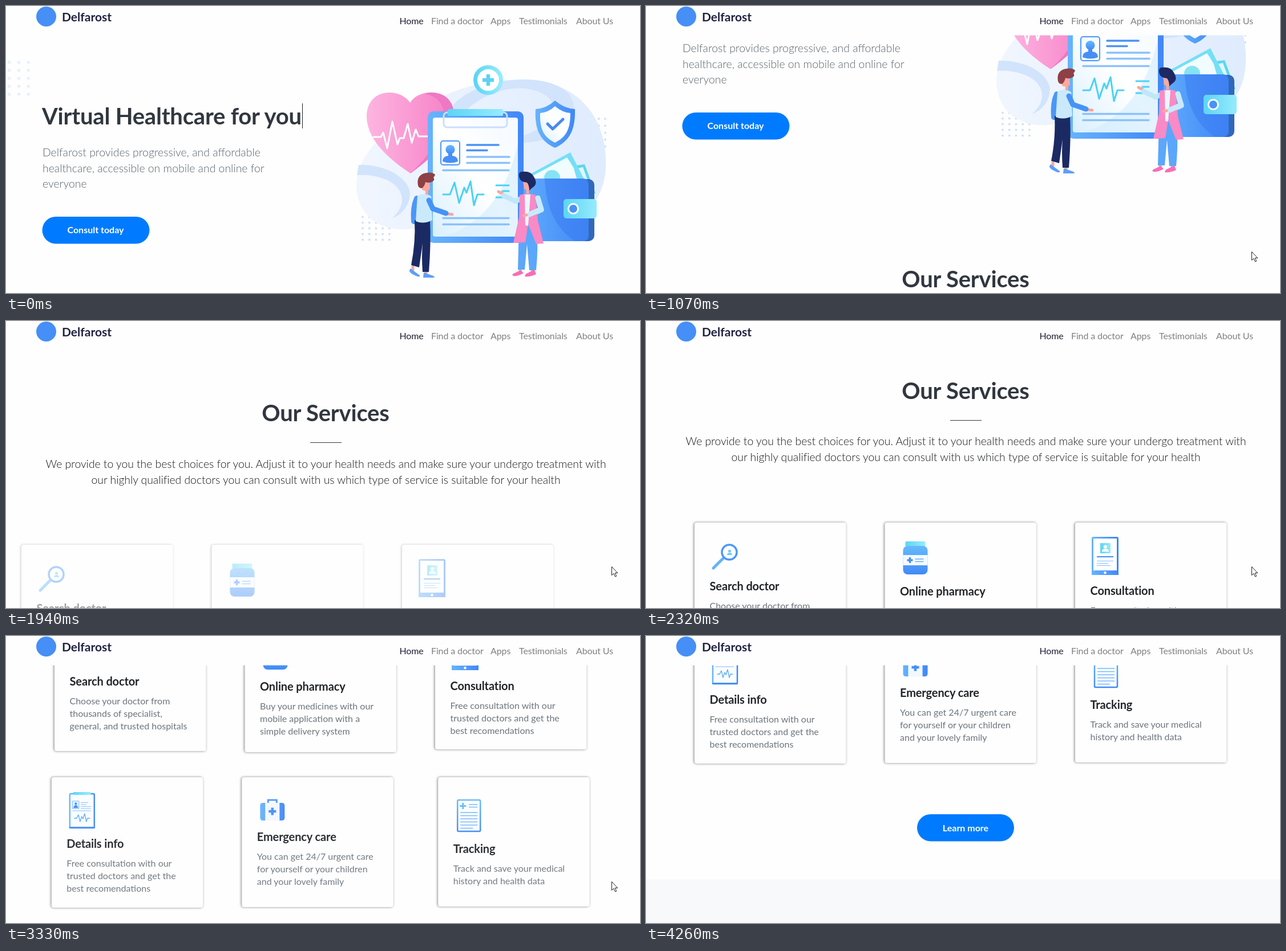
These frames come from a looping animation (1111x504 px, 4660 ms). An HTML page:

```html
<!DOCTYPE html>
<html lang="en">
<head>
<meta charset="utf-8">
<title>Virtual Healthcare</title>
<style>
html, body { margin: 0; height: 100%; overflow: hidden; background: #fefefe; }
svg { display: block; width: 1111px; height: 504px; }
text { font: 16px Lato, "Open Sans", sans-serif; fill: #6c757d; }
.title { font-size: 40px; font-weight: 700; letter-spacing: -.2px; fill: #31373f; }
.lead { font-size: 19.4px; font-weight: 300; fill: #59626a; }
.dark { letter-spacing: -.04px; fill: #14171a; }
.mid { text-anchor: middle; }
.button { font-weight: 700; fill: #fff; text-anchor: middle; }
.nav { fill: #808080; letter-spacing: -.12px; }
.brand { font-size: 21px; font-weight: 700; fill: #1f2340; }
.name { font-size: 20px; font-weight: 700; letter-spacing: -.12px; fill: #212529; }
.card { fill: #fefefe; filter: drop-shadow(-1px 0 2px rgba(0,0,0,.5)); }
.line { fill: none; stroke-linecap: round; stroke-linejoin: round; }
</style>
</head>
<body>
<svg viewBox="0 0 1111 504">
<defs>
  <linearGradient id="blue"><stop stop-color="#67b4fc"/><stop offset="1" stop-color="#4087f8"/></linearGradient>
  <linearGradient id="down" x2="0" y2="1"><stop stop-color="#66bafb"/><stop offset="1" stop-color="#418af7"/></linearGradient>
  <linearGradient id="cyan"><stop stop-color="#5cd5f5"/><stop offset="1" stop-color="#96ebfc"/></linearGradient>
  <linearGradient id="pink"><stop stop-color="#fdb5e1"/><stop offset="1" stop-color="#f77fc6"/></linearGradient>
  <linearGradient id="paper" x1="1" x2="0" y2="1"><stop stop-color="#f4faff"/><stop offset=".5" stop-color="#fff"/><stop offset="1" stop-color="#d8effd"/></linearGradient>
  <linearGradient id="mist"><stop stop-color="#f1f6fe"/><stop offset="1" stop-color="#dfecfe"/></linearGradient>
</defs>
<g id="page">
  <g id="dots"></g>
  <text class="title" x="63" y="208">Virtual Healthcare for you</text>
  <path d="M519.5 171v44" stroke="#222"/>
  <text class="lead" x="64" y="264">Delfarost provides progressive, and affordable</text>
  <text class="lead" x="64" y="292">healthcare, accessible on mobile and online for</text>
  <text class="lead" x="64" y="319">everyone</text>
  <rect x="63.500" y="370" width="188" height="47.500" rx="23.700" fill="#007bff"/>
  <text class="button" x="157" y="399">Consult today</text>

  <!-- backdrop -->
  <path fill="url(#mist)" d="M614 318C612 250 690 200 745 170C800 135 900 115 970 142C1035 168 1054 235 1051 285C1047 350 1000 385 950 390L735 385C670 408 616 375 614 318"/>
  <path fill="#d2e4fc" d="M618 279C665 277 707 302 708 330C707 350 695 366 676 373C694 358 698 340 690 325C678 302 640 295 615 297Z"/>
  <path fill="#d2e4fc" d="M775 185C810 130 920 115 970 142C1000 156 1002 190 985 215C960 232 930 240 905 240V228C945 215 975 185 950 160C910 130 840 145 800 190Z"/>

  <!-- heart -->
  <path fill="url(#pink)" d="M708 170C692 143 631 142 632 196C634 240 680 275 709 294C740 270 785 236 785 190C783 143 724 143 708 170"/>
  <path fill="#ee78c3" d="M734 154C790 165 772 235 709 294C740 270 785 236 785 190C784 160 759 147 734 154"/>
  <path class="line" stroke="#fff" stroke-width="3" d="M644 230h13l4-8 7 28 9-47 9 40 4-11h7l7-25 7 33 7-23 5 12h17"/>

  <!-- plus badge -->
  <circle cx="845" cy="130" r="22.500" fill="#fff" stroke="url(#cyan)" stroke-width="7"/>
  <path d="M845 120v20M835 130h20" stroke="#5bd3f3" stroke-width="6.500"/>

  <!-- banknotes and wallet -->
  <path fill="#5ed6ee" d="M985 282l29-4 19 51-30 2z"/><path fill="#dff7fd" d="M991 287l20-4 15 42-18 1z"/>
  <path fill="#74dff6" d="M917 296l72-39 24 47-80 24z"/><path fill="#f1fcff" d="M923 298l60-32 5 7 7 12 5 18-68 10z"/>
  <circle cx="957" cy="302" r="14" fill="#86e3f4"/>
  <rect x="935" y="304" width="96" height="109" rx="10" fill="#3169b8"/>
  <rect x="880" y="303" width="141" height="110" rx="10" fill="url(#blue)"/>
  <path fill="#3b7df2" opacity=".55" d="M944 303h67q10 0 10 10v90q0 10-10 10h-14q-50-33-53-110"/>
  <rect x="977" y="339" width="58" height="34" rx="5" fill="url(#cyan)"/>
  <circle cx="994" cy="356" r="8.500" fill="#4b90f7" stroke="#fff" stroke-width="3"/>

  <!-- shield -->
  <path fill="url(#blue)" d="M962 166q16 14 35 15c1 34-8 56-35 68-27-12-36-34-34-68q19-1 34-15"/>
  <path fill="url(#paper)" d="M962 176q13 11 27 12c0 28-7 42-27 52-20-10-27-24-26-52q14-1 26-12"/>
  <path class="line" stroke="#448af6" stroke-width="5" d="M949 207l9 9 18-17"/>

  <!-- clipboard -->
  <rect x="739" y="185" width="168" height="231" rx="10" fill="url(#blue)"/>
  <rect x="748" y="196" width="149" height="209" rx="4" fill="url(#paper)"/>
  <path fill="#d3edfd" opacity=".6" d="M897 240v165H768Q870 370 897 240"/>
  <rect x="767" y="187" width="111" height="26" rx="6" fill="none" stroke="#cbdffb" stroke-width="3"/>
  <rect x="774" y="181" width="97" height="12" rx="2" fill="url(#cyan)"/>
  <rect x="762" y="237" width="33" height="42" rx="4" fill="#f7fcff" stroke="#4b98f7" stroke-width="2"/>
  <circle cx="778.500" cy="252" r="8" fill="url(#down)"/>
  <path fill="#478ff6" d="M765 273q0-9 10-10v-6h7v6q10 1 10 10-13 5-27 0"/>
  <g class="line" stroke-width="3.500">
    <path stroke="#4b92f7" d="M808 244h55M808 253.500h35"/>
    <path stroke="#8bc1fa" d="M808 265h74M808 275.500h74M766 288.500h115M766 372.500h115M766 383.500h115"/>
    <path stroke="#4bd2f3" stroke-width="3" d="M766 331h12l8-21 8 36 9-27 4 9 7-20 6 42 6-19h11M859 315h22M870 325h11M859 336h22"/>
  </g>

  <!-- man -->
  <g class="line">
    <path stroke="#4b97f7" stroke-width="10" d="M720 338q-7 15-5 40"/>
    <path stroke="#fba69f" stroke-width="5" d="M713 458v5M736 464v6M774 365l8 1M738 321l-1 9"/>
  </g>
  <path fill="#1c2a63" d="M716 376h27q2 40-2 91h-11q-2-28 0-50l-6 42-14-4q8-40 6-79"/>
  <path fill="#5c9ff8" d="M709 461l16 12q1 3-4 2-15-6-14-11zM732 468l17 6q4 3 0 3h-18z"/>
  <path fill="#caeafc" d="M721 333q12-6 24 1l2 42q-15 8-29 2z"/>
  <path class="line" stroke="#4693f6" stroke-width="9" d="M741 341l7 15 23 8"/>
  <path fill="#fca9a0" d="M728 306h14l1 15q-6 6-14 2z"/>
  <path fill="#8d4046" d="M722 315q-3-16 10-21 14-4 20 2-1 4-3 5 3 4-1 7-7 4-13 1-1 7-6 11-6 0-7-5"/>

  <!-- woman -->
  <g class="line">
    <path stroke="#fba69f" stroke-width="5" d="M901 461v6M922 461v4M871 330l-8-4M914 322v9"/>
    <path stroke="#bfe7f9" stroke-width="9" d="M901 339l-8 4-21-10M932 338l6 20-22 10"/>
  </g>
  <path fill="#5ba7fb" d="M899 385h31q3 40-1 79h-12l-4-46-4 45h-12z"/>
  <path fill="#f56eb7" d="M902 464l5 5q-9 6-18 5-3-2 0-4zM926 463l3 8q-10 5-20 4 1-5 5-6z"/>
  <path fill="#fa8ac5" d="M900 332q14-5 28 0l4 45 10 40-13 1-14-35-5 32-21 1 10-45z"/>
  <path fill="#e9f7fe" d="M909 331h10l-4 55-5-1z"/>
  <path class="line" stroke="#c8ebfb" stroke-width="9" d="M932 337l6 20-21 9"/>
  <path class="line" stroke="#fba69f" stroke-width="5" d="M907 368l5-1"/>
  <path fill="#fca9a0" d="M906 307h17l-1 13q-7 6-14 1z"/>
  <path fill="#1d2963" d="M899 299q-1-8 5-8 16-2 21 9 7 11 0 17-5 4-8 7 0-9-4-14-13-1-14-11"/>

  <!-- services -->
  <text class="title mid" x="560" y="677">Our Services</text>
  <path d="M533 714.500h55" stroke="#343a40"/>
  <g id="intro">
    <text class="lead dark mid" x="560.500" y="758">We provide to you the best choices for you. Adjust it to your health needs and make sure your undergo treatment with</text>
    <text class="lead dark mid" x="560.500" y="786">our highly qualified doctors you can consult with us which type of service is suitable for your health</text>
  </g>
  <g id="cards"></g>
  <rect x="475" y="1492" width="170" height="47.500" rx="23.700" fill="#007bff"/>
  <text class="button" x="560" y="1521.500">Learn more</text>
  <rect y="1606" width="1111" height="200" fill="#f8f9fb"/>
</g>

<!-- fixed header -->
<rect width="1111" height="51.500" fill="#fefefe"/>
<circle cx="70.500" cy="18.500" r="17.500" fill="#458ff6"/>
<text class="brand" x="98" y="27">Delfarost</text>
<text class="nav" x="689.500" y="32" style="fill:#1f1f33">Home</text>
<text class="nav" x="745" y="32">Find a doctor</text>
<text class="nav" x="849" y="32">Apps</text>
<text class="nav" x="899" y="32">Testimonials</text>
<text class="nav" x="999" y="32">About Us</text>
<path id="pointer" d="M.5.500v15l3.500-3.200 2.600 5.700 2.200-1-2.500-5.500h4.500z" fill="#fff" stroke="#222"/>
</svg>
<script>
const LOOP = 4660;
const $ = id => document.getElementById(id);

const grid = (x, y, dx, dy, cols, rows, r, color) =>
  Array.from({ length: cols * rows }, (_, i) =>
    `<circle cx="${x + i % cols * dx}" cy="${y + Math.floor(i / cols) * dy}" r="${r}" fill="${color}"/>`).join('');
$('dots').innerHTML = grid(5.5, 99, 17, 14, 3, 5, 2.8, '#e6f1fe')
  + grid(625, 370.5, 11.7, 10, 5, 5, 2, '#cfe2fb')
  + grid(994, 198, 11.2, 12.2, 6, 5, 2, '#cfe2fb');

// Icons are drawn relative to the card's top left corner.
const icons = {
  search: `<path class="line" d="M50 63L33 80" stroke="#62b3fb" stroke-width="5"/>
    <circle cx="61" cy="52" r="13" fill="#fff" stroke="#4c97f8" stroke-width="3.500"/>
    <circle cx="61.500" cy="50" r="2.500" fill="#6bcdf8"/><path d="M57 57q0-4 4.500-4t4.500 4z" fill="#6bcdf8"/>`,
  bottle: `<rect x="36" y="33" width="35" height="9" rx="2" fill="url(#cyan)"/>
    <rect x="32" y="41" width="43" height="50" rx="8" fill="url(#down)"/>
    <rect x="32" y="57" width="43" height="18" fill="#f5fbff"/>
    <path d="M44 61v10M39 66h10" stroke="#478ff7" stroke-width="3.500"/>
    <path d="M53 64h15M53 68.500h15" stroke="#62aefa" stroke-width="1.500"/>`,
  tablet: `<rect x="30.500" y="26.500" width="44" height="64" rx="1.500" fill="#fff" stroke="url(#blue)" stroke-width="3"/>
    <path d="M29 84h47v8H29z" fill="url(#blue)"/><circle cx="52.500" cy="88" r="2.300" fill="#fff"/>
    <rect x="44" y="36" width="18" height="18" fill="url(#cyan)"/>
    <circle cx="53" cy="42.500" r="3" fill="#fff"/><path d="M47 51q0-5 6-5t6 5z" fill="#fff"/>
    <path d="M38 60h29" stroke="#478ff7" stroke-width="2"/>
    <path d="M38 67.500h29M38 71.500h20M38 75.500h24" stroke="#82bdfa"/>`,
  chart: `<rect x="32" y="29" width="43" height="60" rx="2" fill="#f9fdff" stroke="url(#blue)" stroke-width="2.500"/>
    <path d="M31 88.500h45" stroke="#478ff7" stroke-width="3"/>
    <rect x="38" y="26" width="31" height="5" rx="1" fill="url(#cyan)"/>
    <rect x="37" y="42" width="11" height="13" fill="none" stroke="#62aefa"/>
    <circle cx="42.500" cy="46.500" r="2.300" fill="#478ff7"/><path d="M38.500 54q0-5 4-5t4 5z" fill="#478ff7"/>
    <path d="M51 44.500h13M51 48h10M51 51.500h18M51 55h18M37 59h32" stroke="#82bdfa"/>
    <path class="line" d="M40 72h4l3-6 3 12 3-9 2 4 3-9 3 14 2-6h4" stroke="#55a9f6" stroke-width="1.300"/>`,
  kit: `<path d="M46 45v-5h15v5" fill="none" stroke="#4f9af8" stroke-width="3"/>
    <path d="M42 45h23v31H42z" fill="#f1f8ff"/>
    <path d="M41 45v31h-4q-5 0-5-5V50q0-5 5-5zM66 45v31h4q5 0 5-5V50q0-5-5-5z" fill="url(#blue)"/>
    <path d="M53.500 53.500v13M47 60h13" stroke="#478ff7" stroke-width="4.500"/>`,
  report: `<rect x="34" y="40" width="40" height="55" rx="2" fill="#f9fdff" stroke="url(#down)" stroke-width="2.500"/>
    <path d="M43.500 45v11M38 50.500h11" stroke="#62bdf9" stroke-width="3"/>
    <path d="M54 48h15M54 52.500h15M39 62h30M39 67.500h30M39 73h30M39 78.500h30M39 84h30M39 89.500h22" stroke="#78b7fa" stroke-width="1.500"/>`
};

// [icon, x, top, height, title baseline, slide-in start, slide direction, name, lines]
const cards = [
  ['search', 85, 894, 234, 1013, 1830, -1, 'Search doctor', ['Choose your doctor from', 'thousands of specialist,', 'general, and trusted hospitals']],
  ['bottle', 418.5, 894, 236, 1022, 1830, -1, 'Online pharmacy', ['Buy your medicines with our', 'mobile application with a', 'simple delivery system']],
  ['tablet', 752, 894, 231, 1021, 1830, -1, 'Consultation', ['Free consultation with our', 'trusted doctors and get the', 'best recomendations']],
  ['chart', 85, 1174, 229, 1298, 3046, -1, 'Details info', ['Free consultation with our', 'trusted doctors and get the', 'best recomendations']],
  ['kit', 418.5, 1174, 228, 1286, 3046, -1, 'Emergency care', ['You can get 24/7 urgent care', 'for yourself or your children', 'and your lovely family']],
  ['report', 752, 1174, 227, 1307, 3046, 1, 'Tracking', ['Track and save your medical', 'history and health data']]
].map(([icon, x, top, height, base, start, side, name, lines]) => {
  const node = document.createElementNS('http://www.w3.org/2000/svg', 'g');
  const y = base - top;
  node.innerHTML = `<rect class="card" width="265.500" height="${height}" rx="4"/>${icons[icon]}
    <text class="name" x="26.500" y="${y}">${name}</text>`
    + lines.map((s, i) => `<text x="26.500" y="${y + 32.5 + i * 22.2}">${s}</text>`).join('');
  $('cards').append(node);
  return { node, x, y: top, start, dx: side * 100, dy: 0 };
});

// Everything that fades in while sliding to its place.
const reveals = [{ node: $('intro'), x: 0, y: 0, start: 1590, dx: 0, dy: 100 }, ...cards];

// The picture advances in bursts of evenly spaced steps: [first, last, count].
const bursts = [[230, 380, 3], [530, 1010, 7], [1070, 1540, 7], [1620, 2080, 7], [2170, 2400, 4],
  [2540, 2860, 5], [3010, 3490, 7], [3560, 4030, 7], [4110, 4260, 3]];
const steps = [0, ...bursts.flatMap(([a, b, n]) =>
  Array.from({ length: n }, (_, i) => Math.round((a + (b - a) * i / (n - 1)) / 10) * 10))];

const scrollKeys = [[450, 0], [1070, 183], [1540, 318], [1850, 490], [2080, 523], [2320, 540], [2400, 548],
  [2460, 548], [2780, 616], [2860, 632], [2930, 632], [3330, 926], [3490, 1030], [4030, 1179]];
const pointerKeys = [[0, 520], [230, 450], [380, 431], [3490, 431], [4030, 477], [4190, 495], [4260, 520]];

function valueAt(keys, t) {
  const i = keys.findIndex(k => k[0] > t);
  if (i < 0) return keys[keys.length - 1][1];
  if (i === 0) return keys[0][1];
  const [t0, v0] = keys[i - 1], [t1, v1] = keys[i];
  return v0 + (v1 - v0) * (t - t0) / (t1 - t0);
}

const ease = x => 1 - (1 - x ** 1.25) ** 2.8;

function draw() {
  const now = performance.now() % LOOP;
  const t = steps.filter(s => s <= now + 1).pop();
  $('page').setAttribute('transform', `translate(0 ${-Math.round(valueAt(scrollKeys, t))})`);
  $('pointer').setAttribute('transform', `translate(1061 ${Math.round(valueAt(pointerKeys, t))})`);
  for (const { node, x, y, start, dx, dy } of reveals) {
    const shown = ease(Math.min(1, Math.max(0, (t - start) / 400)));
    node.setAttribute('transform', `translate(${x + dx * (1 - shown)} ${y + dy * (1 - shown)})`);
    node.setAttribute('opacity', shown);
  }
  requestAnimationFrame(draw);
}
draw();
</script>
</body>
</html>
```
